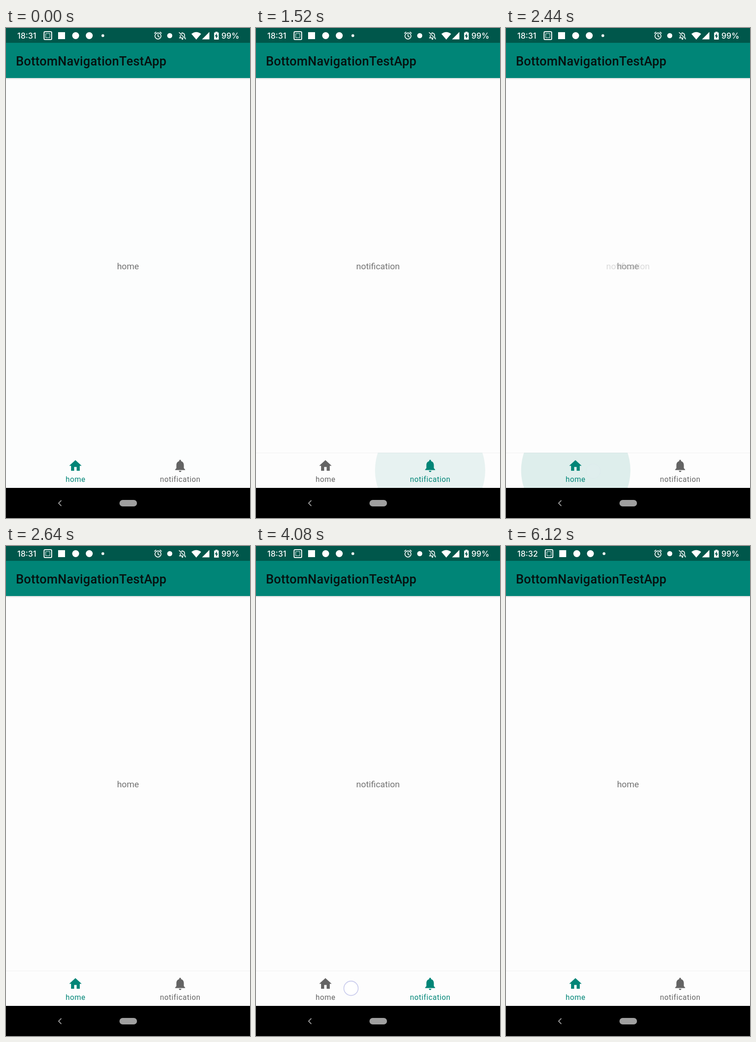
These frames come from a looping animation (529 by 1058 pixels, 6160 ms). An HTML page with a canvas:

```html
<!DOCTYPE html>
<html lang="en">
<head>
<meta charset="utf-8">
<title>Bottom navigation</title>
<style>
html, body { margin: 0; width: 100%; height: 100%; overflow: hidden; background: #000; }
canvas { display: block; width: 100vw; height: 100vh; }
</style>
</head>
<body>
<canvas id="stage" width="529" height="1058"></canvas>
<script>
const ctx = document.getElementById('stage').getContext('2d');
const LOOP = 6160, STEP = 40, DP = 1.347;
const TEAL = '#008577', GREY = '#646464', DARK = '#00574b';
const BAR_TOP = 917, BAR_END = 993, BAR_MID = 955;

const ITEMS = [
  { name: 'home', x: 150.5, icon: new Path2D('M10 20v-6h4v6h5v-8h3L12 3 2 12h3v8z') },
  { name: 'notification', x: 377.5, icon: new Path2D(
    'M12 22c1.1 0 2-.9 2-2h-4c0 1.1.89 2 2 2zm6-6v-5c0-3.07-1.64-5.64-4.5-6.32V4' +
    'c0-.83-.67-1.5-1.5-1.5s-1.5.67-1.5 1.5v.68C7.63 5.36 6 7.92 6 11v5l-2 2v1h16v-1l-2-2z') }
];

// down: finger lands, up: finger lifts and the item is chosen
const TAPS = [
  { down: 1160, up: 1255, x: 403.5, y: 958, alpha: 0.6, item: 1 },
  { down: 2120, up: 2255, x: 189, y: 957, alpha: 0.85, item: 0 },
  { down: 3120, up: 3175, x: 400, y: 957, alpha: 0.85, item: 1 },
  { down: 4080, up: 4135, x: 206, y: 955, alpha: 0.9, item: 0 }
];

const clamp = v => Math.max(0, Math.min(1, v));
const lerp = (a, b, k) => a + (b - a) * k;

// cubic-bezier(.4, 0, .2, 1)
function ease(x) {
  let lo = 0, hi = 1, s = 0.5;
  for (let i = 0; i < 16; i++) {
    s = (lo + hi) / 2;
    const bx = 3 * (1 - s) * (1 - s) * s * 0.4 + 3 * (1 - s) * s * s * 0.2 + s * s * s;
    if (bx < x) lo = s; else hi = s;
  }
  return s * s * (3 - 2 * s);
}

function rect(x, y, w, h, color) {
  ctx.fillStyle = color;
  ctx.fillRect(x, y, w, h);
}

function box(x, y, w, h, r) {
  ctx.beginPath();
  ctx.roundRect(x, y, w, h, r);
}

function disc(x, y, r, color) {
  ctx.beginPath();
  ctx.arc(x, y, r, 0, Math.PI * 2);
  ctx.fillStyle = color;
  ctx.fill();
}

function fillPath(d, color) {
  ctx.fillStyle = color;
  ctx.fill(new Path2D(d));
}

function strokePath(d, color, width) {
  ctx.strokeStyle = color;
  ctx.lineWidth = width;
  ctx.stroke(new Path2D(d));
}

function text(str, x, y, font, color, align = 'left', spacing = 0) {
  ctx.font = font;
  ctx.fillStyle = color;
  ctx.textAlign = align;
  ctx.letterSpacing = spacing + 'px';
  ctx.fillText(str, x, y);
}

function noticeIcons(shift) {
  ctx.save();
  ctx.translate(shift, 0);
  ctx.strokeStyle = '#fff';
  ctx.lineWidth = 2;
  box(82.5, 8, 16.5, 17, 2);
  ctx.stroke();
  ctx.save();
  ctx.setLineDash([1.8, 1.2]);
  ctx.lineWidth = 1.6;
  ctx.strokeRect(86.2, 12, 9, 9);
  ctx.restore();
  rect(113, 9, 15, 15, '#fff');
  disc(151, 16.5, 7.5, '#fff');
  disc(180.5, 16.5, 7.5, '#fff');
  disc(210, 16.5, 3, '#fff');
  ctx.restore();
}

function systemIcons() {
  const W = '#fff';
  // alarm
  ctx.beginPath();
  ctx.arc(329.5, 17.3, 6.6, 0, Math.PI * 2);
  ctx.strokeStyle = W;
  ctx.lineWidth = 1.7;
  ctx.stroke();
  strokePath('M321.5 11.8l4-3.4M337.5 11.8l-4-3.4M329.5 13v4.8l3.3 2', W, 1.6);
  disc(355, 16.5, 5.5, W);
  // muted bell
  strokePath('M377.8 21.2v-5.4c0-6.3 9.4-6.3 9.4 0v5.4M375.3 21.4h14.6M382.5 9.5v2', W, 1.7);
  disc(382.5, 23.7, 1.7, W);
  strokePath('M375.6 10.6l13.6 13.6', DARK, 3.5);
  strokePath('M375 9.2l14.8 15', W, 1.6);
  // wifi, signal, battery
  fillPath('M402 12.8Q412.4 4.8 423 12.8L412.5 25z', W);
  fillPath('M425 24.5L441 8.5V24.5z', W);
  fillPath('M454 8h4.6v1.7h2.6v15.3h-10V9.700h2.800z', W);
  fillPath('M457 11.600l-4.200 6.400h2.600v5l4.200-6.600h-2.600z', DARK);
}

function topBars(t) {
  const late = t >= 6120;
  const clock = '500 17.2px Inter, sans-serif';
  rect(0, 0, 529, 32, DARK);
  rect(0, 32, 529, 76, TEAL);
  const shade = ctx.createLinearGradient(0, 108, 0, 112);
  shade.addColorStop(0, 'rgba(0,0,0,.13)');
  shade.addColorStop(1, 'rgba(0,0,0,0)');
  rect(0, 108, 529, 4, shade);
  text(late ? '18:32' : '18:31', 24.5, 23, clock, '#fff');
  noticeIcons(late ? 2.5 : 0);
  systemIcons();
  text('99%', 467, 23, clock, '#fff');
  text('BottomNavigationTestApp', 21.5, 80.7, '500 26.94px Roboto, sans-serif',
    '#07100f', 'left', 0.337);
}

function page(item, alpha) {
  if (alpha <= 0) return;
  ctx.globalAlpha = alpha;
  text(ITEMS[item].name, 264.5, 520.5, '18.86px Roboto, sans-serif', '#737373', 'center');
  ctx.globalAlpha = 1;
}

function ripple(tap, t) {
  const age = t - tap.up;
  if (age < 0 || age > 380) return;
  const k = ease(clamp(age / 225));
  const alpha = 0.12 * clamp(age / 75) * (1 - clamp((age - 225) / 150));
  ctx.save();
  ctx.beginPath();
  ctx.rect(0, BAR_TOP, 529, BAR_END - BAR_TOP);
  ctx.clip();
  disc(lerp(tap.x, ITEMS[tap.item].x, k), lerp(tap.y, BAR_MID, k), lerp(68, 119.5, k),
    `rgba(0,133,119,${alpha})`);
  ctx.restore();
}

function finger(tap, t) {
  if (t < tap.down || t > tap.up + 200) return;
  ctx.globalAlpha = tap.alpha * (1 - clamp((t - tap.up) / 200));
  disc(tap.x, tap.y, 15.5, 'rgba(255,255,255,.85)');
  ctx.strokeStyle = '#c6c8ec';
  ctx.lineWidth = 1.8;
  ctx.stroke();
  ctx.globalAlpha = 1;
}

function draw(t) {
  const last = TAPS.filter(tap => t >= tap.up).pop();
  const chosen = last ? last.item : 0;
  rect(0, 0, 529, 1058, t < 1240 ? '#fcfdfd' : '#fdfdfd');
  topBars(t);

  const fade = last ? clamp((t - last.up - 20) / 220) : 1;
  page(1 - chosen, 1 - fade);
  page(chosen, fade);

  if (t >= 1240) rect(0, BAR_TOP, 529, 1, '#f1f1f2');
  TAPS.forEach(tap => ripple(tap, t));
  ITEMS.forEach((item, i) => {
    const color = i === chosen ? TEAL : GREY;
    ctx.save();
    ctx.translate(item.x - 12 * DP, 929);
    ctx.scale(DP, DP);
    ctx.fillStyle = color;
    ctx.fill(item.icon);
    ctx.restore();
    text(item.name, item.x + 0.25, 979.5, '16.16px Roboto, sans-serif', color, 'center', 0.54);
  });

  rect(0, BAR_END, 529, 65, '#000');
  strokePath('M120 1020l-6 6l6 6', '#999', 1.9);
  box(246, 1019, 38, 14, 7);
  ctx.fillStyle = '#a0a0a0';
  ctx.fill();
  TAPS.forEach(tap => finger(tap, t));
}

const start = performance.now();
function tick() {
  const t = (performance.now() - start) % LOOP;
  draw(Math.floor(t / STEP) * STEP);
  requestAnimationFrame(tick);
}
tick();
</script>
</body>
</html>
```
